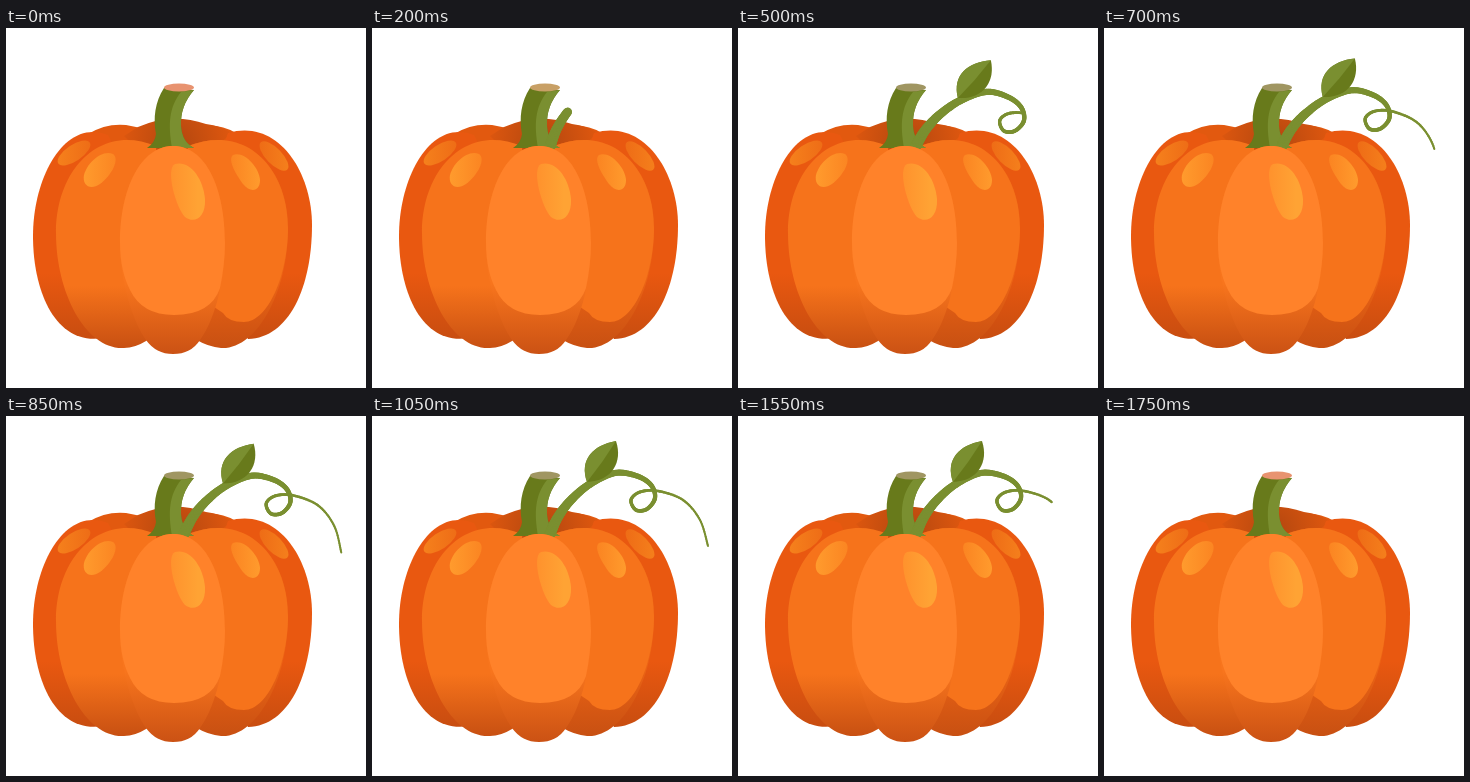
Animation of 360 by 360 pixels, one loop 1.8 s. Source, as an HTML page with a canvas:

```html
<!DOCTYPE html>
<html lang="en">
<head>
<meta charset="utf-8">
<title>Growing pumpkin vine</title>
<style>
  html, body { margin: 0; height: 100%; overflow: hidden; background: #fff; }
  canvas { display: block; width: 360px; height: 360px; }
</style>
</head>
<body>
<canvas id="stage" width="360" height="360"></canvas>
<script>
const ctx = document.getElementById('stage').getContext('2d');
const LOOP = 1800;
const BASE = [178, 116];
const LIGHT = '#7a8f30', DARK = '#687a1b';

// [time, value] keys
const growth = [[100, 0], [200, 38], [350, 105], [500, 210], [600, 242], [700, 272],
  [780, 300], [1400, 300], [1550, 245], [1650, 130], [1700, 45], [1740, 0]];
const sway = [[200, -4], [350, 1], [500, 5.8], [700, 4.5], [1020, 0]];

const vinePoints = [[178, 118], [186, 101], [199, 84], [218, 68], [243, 57], [265, 60],
  [279, 69], [283, 82], [275, 93], [264, 94], [259, 84], [268, 76], [286, 75],
  [311, 84], [328, 104], [336, 130]];

function at(keys, t) {
  if (t <= keys[0][0]) return keys[0][1];
  for (let i = 1; i < keys.length; i++) {
    const [t0, a] = keys[i - 1], [t1, b] = keys[i];
    if (t < t1) return a + (b - a) * (t - t0) / (t1 - t0);
  }
  return keys[keys.length - 1][1];
}

// Catmull-Rom curve sampled as {x, y, s}, s being the length so far
function sampleCurve(pts) {
  const out = [{ x: pts[0][0], y: pts[0][1], s: 0 }];
  const get = i => pts[Math.max(0, Math.min(pts.length - 1, i))];
  for (let i = 0; i < pts.length - 1; i++) {
    const [a, b, c, d] = [get(i - 1), get(i), get(i + 1), get(i + 2)];
    for (let k = 1; k <= 12; k++) {
      const u = k / 12;
      const [x, y] = [0, 1].map(j => b[j] + u / 2 * (c[j] - a[j] +
        u * (2 * a[j] - 5 * b[j] + 4 * c[j] - d[j] + u * (3 * (b[j] - c[j]) + d[j] - a[j]))));
      const last = out[out.length - 1];
      out.push({ x, y, s: last.s + Math.hypot(x - last.x, y - last.y) });
    }
  }
  return out;
}
const vine = sampleCurve(vinePoints);

function fill(path, color) {
  ctx.fillStyle = color;
  ctx.fill(new Path2D(path));
}

function blend(g, from, to) {
  g.addColorStop(0, from);
  g.addColorStop(1, to);
  return g;
}
const fadeY = (y0, y1, from, to) => blend(ctx.createLinearGradient(0, y0, 0, y1), from, to);
const fadeX = (x0, x1, from, to) => blend(ctx.createLinearGradient(x0, 0, x1, 0), from, to);

function ellipse(x, y, rx, ry, deg, color) {
  ctx.fillStyle = color;
  ctx.beginPath();
  ctx.ellipse(x, y, rx, ry, deg * Math.PI / 180, 0, 7);
  ctx.fill();
}

function drawBack() {
  const hollow = blend(ctx.createRadialGradient(170, 114, 8, 170, 114, 62), '#b9490f', '#e3590f');
  fill('M82 106Q100 95 120 97L140 101L190 99Q212 94 230 105L215 140H110Z', '#e2590f');
  fill('M132 99Q165 84 200 96Q215 98 226 105L190 135H145L118 108Z', hollow);
  const side = fadeY(245, 312, '#e95810', '#c84d10');
  fill('M102 107C58 90 27 150 27 208C27 266 51 318 97 310L150 200Z', side);
  fill('M222 105C272 90 306 144 306 197C306 259 283 310 242 311L190 200Z', side);
  fill('M150 118C95 95 50 140 50 205C50 265 80 322 118 320Q140 320 165 290Z',
    fadeY(258, 320, '#f6731b', '#c85012'));
  fill('M182 118C240 95 282 140 282 200C282 265 250 322 215 320Q190 318 165 290Z',
    fadeY(250, 320, '#ec6415', '#c85012'));
  fill('M182 118C240 95 282 140 282 200C282 247 262 294 238 294Q222 294 217 285L165 250Z', '#f6731b');
}

function drawFront() {
  fill('M167 118C135 118 114 160 114 215C114 250 125 290 140 312Q150 326 167 326Q185 326 194 312' +
    'C210 290 219 250 219 215C219 160 200 118 167 118Z', fadeY(255, 326, '#f8751d', '#cb5214'));
  fill('M167 118C135 118 114 160 114 215C114 235 118 250 124 262Q136 287 168 287Q205 287 214 260' +
    'C217 245 219 230 219 215C219 160 200 118 167 118Z', '#ff822a');
  ellipse(68, 125, 19, 8, -34, fadeX(52, 86, '#f5801c', '#ee6c16'));
  ellipse(268, 128, 19, 8, 46, fadeX(253, 284, '#ee6c16', '#f5801c'));
  fill('M107 126C114 131 106 147 94 156C84 163 76 157 78 147C81 135 96 121 107 126Z',
    fadeX(78, 110, '#ff9b2d', '#fb8522'));
  fill('M227 127C238 123 253 139 254 152C254 164 244 165 237 156C231 148 221 132 227 127Z',
    fadeX(226, 254, '#fb8522', '#ff9b2d'));
  fill('M169 136C183 132 197 149 199 171C200 190 188 196 179 189C170 180 159 141 169 136Z',
    fadeX(165, 192, '#ff922d', '#ffa334'));
}

function drawStem(len) {
  fill('M158 60C149 74 147 90 150 106Q149 115 141 120L188 120Q176 114 175 98Q174 78 188 62Z', DARK);
  fill('M188 62Q174 78 175 98Q176 114 188 120H166C162 96 163 79 175 64Z', LIGHT);
  const cut = [0, 1, 2].map(i =>
    at([[0, [232, 147, 112][i]], [38, [200, 160, 102][i]], [180, [160, 150, 98][i]]], len));
  ellipse(173, 59.5, 15, 4, 0, `rgb(${cut})`);
}

function drawLeaf(size) {
  ctx.save();
  ctx.translate(215, 66);
  ctx.scale(size, size);
  fill('M0 0C-8 -22 6 -37 29 -41C36 -20 25 -1 0 0Z', DARK);
  fill('M0 0C-8 -22 6 -37 29 -41Q16 -20 0 0Z', LIGHT);
  ctx.restore();
}

function drawVine(len, deg) {
  if (len <= 0) return;
  ctx.save();
  ctx.translate(...BASE);
  ctx.rotate(deg * Math.PI / 180);
  ctx.translate(-BASE[0], -BASE[1]);
  ctx.strokeStyle = LIGHT;
  ctx.lineCap = 'round';
  for (let i = 1; i < vine.length && vine[i - 1].s < len; i++) {
    const a = vine[i - 1], b = vine[i];
    const u = Math.min(1, (len - a.s) / (b.s - a.s));
    ctx.lineWidth = 2 + 9 * Math.max(0, 1 - a.s / 290) ** 2;
    ctx.beginPath();
    ctx.moveTo(a.x, a.y);
    ctx.lineTo(a.x + (b.x - a.x) * u, a.y + (b.y - a.y) * u);
    ctx.stroke();
  }
  const size = at([[65, 0], [105, 1]], len);
  if (size) drawLeaf(size);
  ctx.restore();
}

const start = performance.now();
function draw() {
  const t = Math.max(0, performance.now() - start) % LOOP;
  const len = at(growth, t);
  ctx.fillStyle = '#fff';
  ctx.fillRect(0, 0, 360, 360);
  drawBack();
  drawStem(len);
  drawVine(len, at(sway, t));
  drawFront();
  requestAnimationFrame(draw);
}
draw();
</script>
</body>
</html>
```
